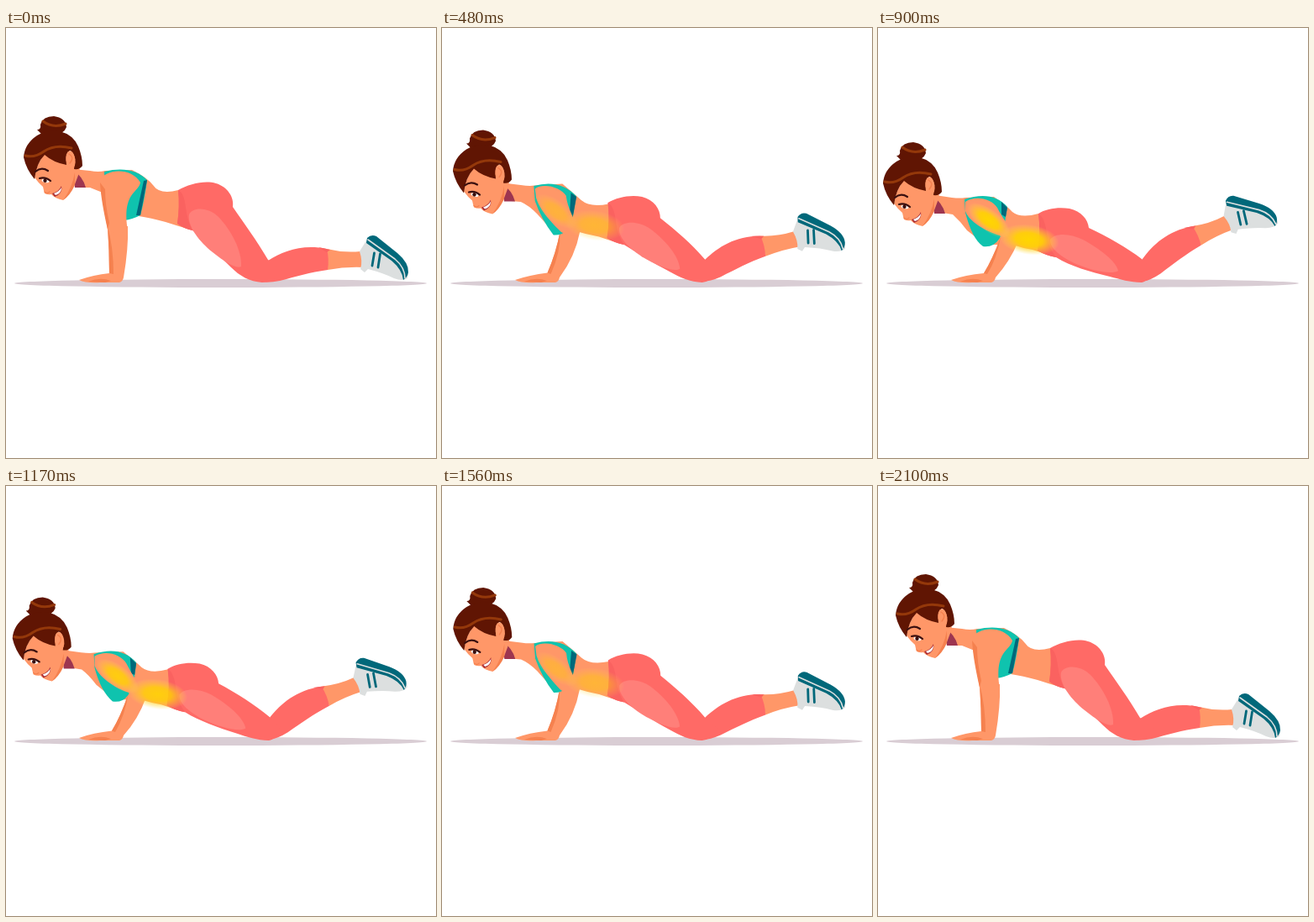
These frames come from a looping animation (512 px wide and 512 px high, 2250 ms). An HTML page with a canvas:

```html
<!DOCTYPE html>
<html lang="en">
<head>
<meta charset="utf-8">
<title>Knee push-up</title>
<style>
html, body { margin: 0; width: 100%; height: 100%; overflow: hidden; background: #fff; }
canvas { display: block; width: 100%; height: 100%; }
</style>
</head>
<body>
<canvas id="c"></canvas>
<script>
const canvas = document.getElementById('c');
const ctx = canvas.getContext('2d');
const dpr = window.devicePixelRatio || 1;
canvas.width = canvas.height = 512 * dpr;

const LOOP = 2250, STEP = 30, DOWN = 900, HOLD = 1050, UP = 2100;
const SKIN = '#ff9768', SHADE = '#f5814f', HAIR = '#601503', LOCK = '#94380a',
  PANTS = '#ff6a66', PANTS_LIT = '#ff7f79', PANTS_DIM = '#fa6260',
  TEAL = '#0fc3ae', DEEP = '#00687a', SHOE = '#dcdfdf', LINE = '#3a1010';

const clamp = v => Math.max(0, Math.min(1, v));
const lerp = (a, b, k) => a + (b - a) * k;
const NUM = /-?\d+(\.\d+)?/g;

// Blend matching path strings; p runs from 0 (arms straight) to 1 (lowered).
function morph(keys, p) {
  const at = keys.length === 2 ? [0, 1] : [0, 1 / 3, 0.7, 1];
  let i = 0;
  while (i < at.length - 2 && p > at[i + 1]) i++;
  const k = (p - at[i]) / (at[i + 1] - at[i]);
  const to = keys[i + 1].match(NUM);
  let n = 0;
  return keys[i].replace(NUM, v => lerp(+v, +to[n++], k).toFixed(2));
}

function fill(d, color) {
  ctx.fillStyle = color;
  ctx.fill(new Path2D(d));
}

function stroke(d, color, width) {
  ctx.strokeStyle = color;
  ctx.lineWidth = width;
  ctx.stroke(new Path2D(d));
}

function oval(x, y, rx, ry, turn, color) {
  ctx.fillStyle = color;
  ctx.beginPath();
  ctx.ellipse(x, y, rx, ry, turn, 0, Math.PI * 2);
  ctx.fill();
}

const torso = [
  'M80 168 L100 170 Q110 172 118 170 L150 169 Q168 178 175 187 Q183 199 205 193 L220 240 Q205 236 190 231 Q172 226 158 224 L142 224 L120 198 Q110 194 100 190 L82 190 Z',
  'M76 178 L96 181 Q106 182 113 181 L145 179 Q162 191 168 198 Q178 208 201 204 L217 250 Q202 247 188 242 Q172 239 158 234 L137 239 L117 211 Q106 203 96 200 L78 200 Z',
  'M71 190 L92 192 Q102 194 108 193 L142 191 Q157 206 164 211 Q175 219 196 214 L213 263 Q199 259 186 254 Q172 251 160 248 L132 249 L110 230 Q101 218 92 213 L74 210 Z',
  'M68 199 L88 202 Q98 203 104 202 L138 201 Q154 212 160 219 Q170 227 191 221 L210 272 Q196 268 184 264 Q172 262 160 258 L128 258 L106 241 Q98 230 89 222 L70 219 Z'
];
const bra = [
  'M117 171 Q150 163 168 181 Q165 205 160 223 Q150 228 141 229 Q128 215 118 195 Z',
  'M112 181 Q143 174 163 193 Q160 212 156 228 Q150 239 136 241 Q124 222 114 200 Z',
  'M107 194 Q138 184 157 206 Q156 216 155 226 Q149 255 130 251 Q114 234 108 211 Z',
  'M103 204 Q136 193 154 213 Q153 220 152 225 Q148 263 125 260 Q112 251 104 220 Z'
];
const band = [
  'M164 182 L168 181 L160 223 L155 223 Z',
  'M159 192 L164 194 L156 228 L151 228 Z',
  'M149 200 L157 207 L155 225 L152 225 Z',
  'M147 207 L154 214 L152 225 L147 222 Z'
];
const pants = [
  'M205 193 C218 186 236 181 250 185 C264 189 272 202 270 213 C283 232 298 252 312 276 L330 290 Q318 303 305 303 C290 302 278 295 268 285 C250 268 236 250 222 241 Q212 239 204 233 Q207 212 205 193 Z',
  'M191 221 C200 215 215 213 228 215 C242 218 250 228 251 238 C273 248 297 262 314 275 L326 286 Q322 302 314 303 C300 303 288 299 276 296 C252 290 230 284 212 273 Q200 271 190 265 Q194 243 191 221 Z'
];
const hip = [
  'M205 193 Q212 196 214 214 Q216 230 222 241 Q212 239 204 233 Q207 212 205 193 Z',
  'M191 221 Q199 226 201 246 Q203 262 212 273 Q200 271 190 265 Q194 243 191 221 Z'
];
const thigh = [
  'M218 222 C222 213 240 213 252 224 C268 240 281 265 280 284 C274 288 255 275 240 262 C225 248 216 233 218 222 Z',
  'M205 252 C210 244 228 244 244 252 C264 263 283 277 286 289 C278 294 255 289 236 281 C218 273 204 262 205 252 Z'
];
const upperArm = [
  'M112 182 C118 167 150 166 160 184 C158 196 138 196 145 240 C140 246 128 246 121 240 C119 225 113 200 112 182 Z',
  'M114 186 C122 178 146 184 151 192 C146 207 158 226 161 238 C160 246 150 246 136 242 C132 228 122 212 117 198 Z',
  'M108 196 C120 189 138 195 145 206 C152 220 158 232 166 244 C166 254 155 252 147 244 C132 238 112 222 108 206 Z',
  'M104 207 C116 199 135 203 142 214 C148 226 156 236 165 249 C165 260 152 256 145 247 C128 242 108 230 104 218 Z'
];
const HAND = ' Q104 294 87 300 Q95 304 112 303 L135 303 Q139 302 140 297 ';
const forearm = [
  'M121 236 Q123 265 123 292' + HAND + 'Q146 262 145 236 Z',
  'M135 240 Q133 266 125 292' + HAND + 'Q158 268 161 238 Z',
  'M145 245 Q138 270 126 291' + HAND + 'Q159 276 167 246 Z',
  'M146 249 Q136 276 126 292' + HAND + 'Q157 278 167 254 Z'
];
const foreShade = [
  'M121 236 Q123 265 123 292 L128 293 Q128 262 121 236 Z',
  'M135 240 Q133 266 125 292 L129 293 Q140 264 135 240 Z',
  'M145 245 Q138 270 126 291 L130 293 Q143 268 145 245 Z',
  'M146 249 Q136 276 126 292 L130 293 Q141 276 146 249 Z'
];

function lowerLeg(p) {
  ctx.save();
  ctx.translate(lerp(305, 318, p), lerp(303, 302, p));
  ctx.rotate(-22.1 * p * Math.PI / 180);
  ctx.translate(-305, -303);
  fill('M382 263 Q402 268 422 266 L426 285 Q404 284 383 288 Z', SKIN);
  fill('M312 277 C330 266 352 257 382 263 Q385 275 383 288 C362 291 345 296 326 301 Q312 304 303 302 L300 290 Z', PANTS);
  fill('M372 261 L386 264 L382 267 Z', PANTS_DIM);
  fill('M431 250 L421 266 Q425 278 422 287 L427 291 L431 287 Q450 292 462 298 Q472 302 478 298 Q480 290 474 282 L438 250 Z', SHOE);
  fill('M430 250 Q435 245 441 248 L466 268 Q480 280 479 291 Q478 297 473 300 Q472 288 459 277 L429 256 Z', DEEP);
  stroke('M431 252 L463 275 Q475 285 475 298', SHOE, 1.6);
  stroke('M438.5 268 L436 283 M445.5 269 L443 285', DEEP, 2.8);
  ctx.restore();
}

function head(p) {
  ctx.save();
  ctx.translate(-15 * p, 31 * p);
  fill('M80 170 Q91 176 95 190 L82 190 Z', '#9d3550');
  fill('M46 150 Q36 162 34 178 Q39 185 44 189 Q45 194 46 197 Q50 199 54 198 Q58 203 68 205 Q75 200 82 186 L88 170 L84 146 Z', SKIN);
  fill('M82 172 Q79 190 68 205 Q76 200 82 187 Z', SHADE);
  // bun and hair
  fill('M37 121 Q42 121 41 115 Q44 105 57 105 Q71 107 72 118 Q69 126 58 127 L44 128 Z', HAIR);
  stroke('M44 111 Q56 120 71 114', LOCK, 3);
  fill('M34 180 Q24 168 21 154 Q22 138 37 128 Q49 121 64 123 Q80 127 86 141 Q91 153 91 164 Q88 169 81 168 Q84 148 76 146 Q70 149 72 163 Q56 160 46 151 Q36 161 34 180 Z', HAIR);
  stroke('M23 152 Q34 155 45 147 Q58 138 78 143', LOCK, 3);
  oval(77, 157, 5.5, 10.5, -0.15, SKIN);
  stroke('M75 150 Q82 154 76 161', SHADE, 1.4);
  // face
  stroke('M35 171 Q42 165 50 170', LINE, 2.2);
  oval(47, 182, 4.5, 2, 0.25, '#fff');
  oval(46.5, 181.8, 2.2, 2.3, 0, LINE);
  stroke('M40 179 Q47 177 53 182', LINE, 2.2);
  stroke('M46 195 Q49 198 52 195', SHADE, 1.2);
  fill('M55 197 Q63 195 66 188 Q68 197 58 201 Z', '#a82c35');
  fill('M57 197 Q63 195 66 190 Q66 197 59 199 Z', '#fff');
  ctx.restore();
}

function glow(x, y, rx, ry, turn, alpha) {
  if (alpha <= 0) return;
  ctx.save();
  ctx.globalAlpha = alpha;
  ctx.translate(x, y);
  ctx.rotate(turn);
  ctx.scale(rx, ry);
  const g = ctx.createRadialGradient(0, 0, 0, 0, 0, 1);
  g.addColorStop(0, 'rgba(255,214,0,1)');
  g.addColorStop(0.45, 'rgba(255,210,5,.92)');
  g.addColorStop(0.75, 'rgba(255,212,40,.42)');
  g.addColorStop(1, 'rgba(255,225,80,0)');
  oval(0, 0, 1, 1, 0, g);
  ctx.restore();
}

function draw(p) {
  ctx.setTransform(dpr, 0, 0, dpr, 0, 0);
  ctx.fillStyle = '#fff';
  ctx.fillRect(0, 0, 512, 512);
  ctx.lineCap = 'round';

  oval(255.5, 304, 245.5, 5, 0, '#d9cdd4');
  fill(morph(torso, p), SKIN);
  head(p);
  fill(morph(forearm, p), SKIN);
  fill(morph(foreShade, p), SHADE);
  fill('M98 302 Q112 296 125 301 L118 303 Z', SHADE);
  fill(morph(bra, p), TEAL);
  fill(morph(band, p), DEEP);
  lowerLeg(p);
  fill(morph(pants, p), PANTS);
  fill(morph(hip, p), PANTS_DIM);
  fill(morph(thigh, p), PANTS_LIT);
  fill(morph(upperArm, p), SKIN);

  ctx.globalAlpha = clamp(1 - 4 * p);
  fill('M112 184 Q113 205 121 240 L123 232 Q118 210 118 192 Z', SHADE);
  ctx.globalAlpha = 1;

  glow(lerp(184, 180, p), lerp(216, 252, p), 36, 18, 0.14, clamp((p - 0.1) * 1.12));
  glow(lerp(140, 132, p), lerp(206, 229, p), 30, 13, 0.65, clamp((p - 0.18) * 1.22));
}

function progress(ms) {
  const t = Math.floor(ms % LOOP / STEP) * STEP;
  if (t < DOWN) return t / DOWN;
  return 1 - clamp((t - HOLD) / (UP - HOLD));
}

const start = performance.now();
function tick() {
  draw(progress(performance.now() - start));
  requestAnimationFrame(tick);
}
tick();
</script>
</body>
</html>
```
